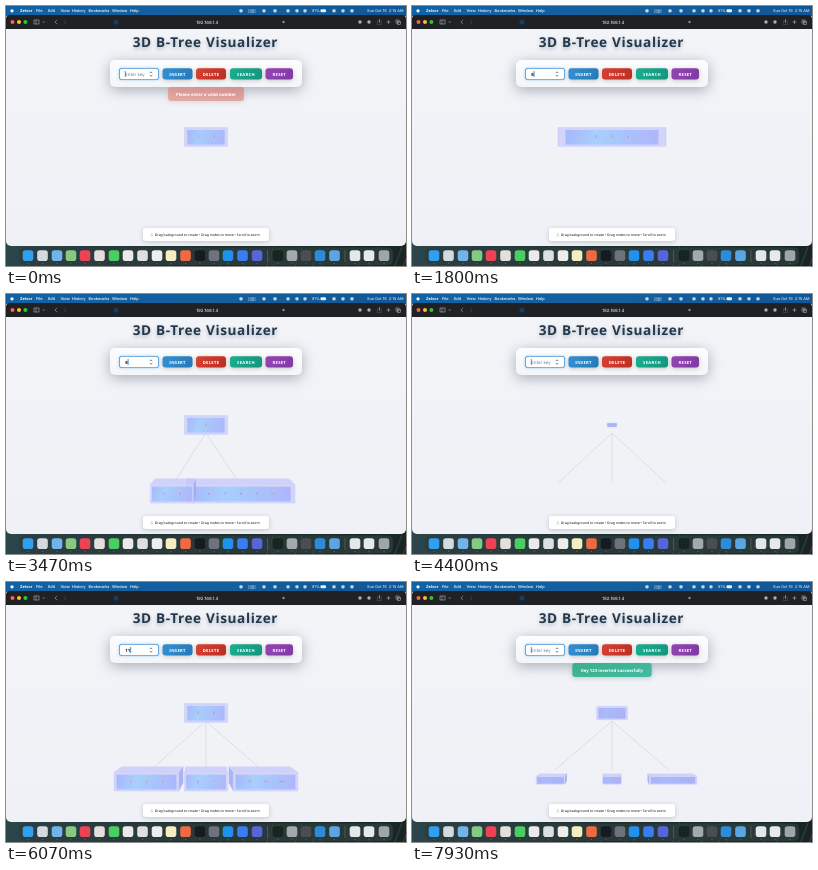
Recreate the animation shown at these times as an HTML page with a canvas. Size 400 by 260 pixels, loop 8 s.

```html
<!DOCTYPE html>
<html lang="en">
<head>
<meta charset="utf-8">
<title>3D B-Tree Visualizer</title>
<style>
  html, body { margin: 0; width: 100%; height: 100%; overflow: hidden; background: #eff1f6; }
  canvas { display: block; width: 100vw; height: 100vh; }
</style>
</head>
<body>
<canvas width="400" height="260"></canvas>
<script>
const ctx = document.querySelector('canvas').getContext('2d');
ctx.textRendering = 'geometricPrecision';
const LOOP = 8000;
const SANS = '"Noto Sans", "Open Sans", sans-serif';
const UI = 'Inter, Roboto, sans-serif';

// Each insert rebuilds the tree. kids: [centre x, number of keys]
const inserts = [
  { at: -600, key: 3 },
  { at: 450, key: 5, typed: 250 },
  { at: 800, key: 6, typed: 620 },
  { at: 1100, key: 7, typed: 950 },
  { at: 1950, key: 8, typed: 1750, kids: [[165, 2], [224, 3]] },
  { at: 2330, key: 9, typed: 2180, kids: [[166, 2], [232, 4]] },
  { at: 2720, key: 10, typed: 2430, kids: [[166, 2], [235, 5]] },
  { at: 4358, key: 88, typed: 3400, kids: [[143, 2], [200, 2], [257, 3]] },
  { at: 5250, key: 2, typed: 4950, kids: [[140.5, 3], [200, 2], [259.5, 3]] },
  { at: 6700, key: 113, typed: 5800, kids: [[140.5, 3], [200, 2], [260, 4]] },
  { at: 7757, key: 123, typed: 7000, kids: [[138.5, 3], [200, 2], [261, 5]] },
];

const clamp = v => Math.max(0, Math.min(1, v));
const easeOut = v => 1 - (1 - clamp(v)) ** 3;

function box(x0, y0, x1, y1, fill, radius = 0) {
  ctx.fillStyle = fill;
  ctx.beginPath();
  ctx.roundRect(x0, y0, x1 - x0, y1 - y0, radius);
  ctx.fill();
}

function disc(x, y, r, fill) {
  ctx.fillStyle = fill;
  ctx.beginPath();
  ctx.arc(x, y, r, 0, 7);
  ctx.fill();
}

function path(points, stroke, width = 0.6) {
  ctx.strokeStyle = stroke;
  ctx.lineWidth = width;
  ctx.beginPath();
  points.forEach(([x, y]) => ctx.lineTo(x, y));
  ctx.stroke();
}

function quad(points, fill) {
  ctx.fillStyle = fill;
  ctx.beginPath();
  points.forEach(([x, y]) => ctx.lineTo(x, y));
  ctx.fill();
}

function text(str, x, y, size, fill, { align = 'left', weight = 400, family = SANS, spacing = 0 } = {}) {
  ctx.font = `${weight} ${size}px ${family}`;
  ctx.letterSpacing = spacing + 'px';
  ctx.textAlign = align;
  ctx.fillStyle = fill;
  ctx.fillText(str, x, y);
}

function gradient(x0, y0, x1, y1, ...colors) {
  const g = ctx.createLinearGradient(x0, y0, x1, y1);
  colors.forEach((c, i) => g.addColorStop(i / (colors.length - 1), c));
  return g;
}

function shadowed(color, blur, dy, draw) {
  ctx.save();
  ctx.shadowColor = color;
  ctx.shadowBlur = blur;
  ctx.shadowOffsetY = dy;
  draw();
  ctx.restore();
}

function drawMenuBar() {
  box(0, 0, 400, 10, gradient(0, 0, 400, 0, '#1262a5', '#14609f', '#0f5797'));
  disc(6, 4.8, 1.6, '#fff');
  const menus = [['Zelvor', 14, 700], ['File', 30], ['Edit', 42], ['View', 54.5], ['History', 66],
    ['Bookmarks', 82.5], ['Window', 106], ['Help', 124]];
  for (const [label, x, weight = 500] of menus) text(label, x, 6.2, 3.9, '#fff', { family: UI, weight });
  for (const x of [235, 258, 269, 282, 291, 299, 328, 337, 346])
    box(x - 1.7, 3.2, x + 1.7, 6.4, 'rgba(255,255,255,.75)', 1.4);
  text('0 KB/s', 242, 4.5, 2.5, '#fff', { family: UI });
  text('0 KB/s', 242, 7.3, 2.5, '#fff', { family: UI });
  text('91%', 306, 6.2, 3.8, '#fff', { family: UI });
  box(314.5, 3.3, 320, 6.3, '#e8f0f8', 1);
  text('Sun Oct 19  2:15 AM', 397.5, 6.2, 3.9, '#fff', { family: UI, align: 'right' });
}

function drawBrowserBar() {
  box(0, 9, 400, 23, '#202124', [4, 4, 0, 0]);
  disc(6.5, 16, 2, '#ff5f57');
  disc(13, 16, 2, '#febc2e');
  disc(19.4, 16, 2, '#28c840');
  const ink = '#adafb2';
  ctx.strokeStyle = ink;
  ctx.lineWidth = 0.6;
  ctx.strokeRect(28, 14, 5, 4);
  path([[30, 14], [30, 18]], ink);
  path([[36.5, 15.3], [37.7, 16.5], [38.9, 15.3]], ink);
  path([[51, 13.8], [49, 16], [51, 18.2]], ink);
  path([[58, 13.8], [60, 16], [58, 18.2]], '#505255');
  disc(110, 16, 2.6, '#173d5e');
  text('192.168.1.4', 201.3, 17.5, 4.4, '#fff', { align: 'center', family: UI });
  disc(277.5, 16, 1.2, '#8b8d90');
  disc(354, 16, 1.7, ink);
  disc(363, 16, 1.7, ink);
  ctx.strokeRect(371.5, 15, 4, 3.3);
  path([[373.5, 17], [373.5, 13]], ink);
  path([[380.5, 16], [384.5, 16]], ink);
  path([[382.5, 14], [382.5, 18]], ink);
  ctx.strokeRect(390, 14, 3, 3);
  ctx.strokeRect(391.3, 15.3, 3, 3);
}

function drawDock() {
  box(0, 234, 400, 260, gradient(0, 0, 400, 0, '#2b474c', '#26393c', '#1b2a26', '#1f2f29', '#182523'));
  for (let i = 0; i < 26; i++) {
    const x = i * 16 + 5 * Math.sin(i * 4);
    path([[x, 260], [x + 7, 241]], i > 15 && i < 20 ? '#345b3b' : '#30484b', 1);
  }
  box(0, 23, 400, 240, gradient(0, 23, 0, 240, '#f2f4f8', '#eff1f6'), [0, 0, 5, 5]);
  box(13, 241.5, 387, 259, 'rgba(44,60,62,.8)', 5);
  const icons = [
    ['#2f9ff0', 22], ['#d5dae0', 36.5], ['#6fb4ea', 51], ['#86c982', 65], ['#ee4258', 79],
    ['#e4dfdc', 93.5], ['#48cf5f', 108], ['#eceae6', 122], ['#dedfe0', 136.5], ['#ededed', 151],
    ['#f5ecc2', 165], ['#ee6a42', 179.5], ['#171b20', 194], ['#6d737a', 208], ['#2390ec', 222],
    ['#397ef1', 236.5], ['#5865d8', 251], ['#17251f', 272], ['#a3a9ad', 286], ['#4a4e53', 300],
    ['#2f8bd6', 314], ['#5aa6e4', 328.5], ['#e4e7e8', 349], ['#e8eaea', 363], ['#a0a6a8', 378],
  ];
  for (const [color, x] of icons) {
    box(x - 5.3, 244.3, x + 5.3, 255, color, 2.8);
    disc(x, 257.3, 0.5, 'rgba(200,210,210,.45)');
  }
  for (const x of [261.5, 339]) path([[x, 244], [x, 256]], 'rgba(200,210,210,.35)');
}

function drawControls(value) {
  shadowed('rgba(44,62,80,.35)', 4, 1.5, () =>
    text('3D B-Tree Visualizer', 126.7, 41, 13.6, '#24384c', { weight: 700, spacing: 0.62 }));
  shadowed('rgba(40,50,70,.38)', 14, 3, () =>
    box(104, 54, 296, 81, gradient(0, 54, 0, 81, '#fdfdfe', '#f4f5f8'), 5));

  shadowed('rgba(52,152,219,.5)', 3, 0, () => box(113, 62, 153, 74, '#4a97d8', 3));
  box(113.8, 62.8, 152.2, 73.2, '#fff', 2.3);
  text(value || 'Enter key', 119.3, 69.6, 4.4, value ? '#111' : '#70757c', { weight: value ? 600 : 400 });
  const caret = value ? 119.6 + ctx.measureText(value).width : 119.3;
  path([[caret, 65], [caret, 71]], '#2478c8', 0.8);
  path([[143.8, 67.2], [145, 65.8], [146.2, 67.2]], '#555', 0.7);
  path([[143.8, 69], [145, 70.4], [146.2, 69]], '#555', 0.7);

  const buttons = [
    ['INSERT', 156.5, 186.5, '#3390d2', '#2779b5'], ['DELETE', 190, 220, '#d94032', '#b92f25'],
    ['SEARCH', 224, 256, '#1aae8e', '#14947c'], ['RESET', 259.5, 287, '#9445b2', '#7f3aa2'],
  ];
  for (const [label, x0, x1, light, dark] of buttons) {
    shadowed('rgba(0,0,0,.22)', 4, 1, () => box(x0, 62.3, x1, 73.6, gradient(x0, 62, x1, 74, light, dark), 3));
    text(label, (x0 + x1) / 2, 69.5, 4.2, '#fff', { align: 'center', weight: 700, spacing: 0.27 });
  }
}

function drawHint() {
  shadowed('rgba(40,50,70,.25)', 5, 1, () => box(137, 222, 263, 235, '#fff', 3));
  box(144.5, 226.8, 147, 231, '#e2e4e8', 1.2);
  text('Drag background to rotate • Drag nodes to move • Scroll to zoom', 148.8, 229.8, 3.45, '#111', { weight: 500 });
}

function drawMessage(label, alpha, half, light, dark) {
  if (alpha <= 0) return;
  ctx.save();
  ctx.globalAlpha = alpha;
  shadowed('rgba(0,0,0,.18)', 5, 1.5, () =>
    box(200 - half, 81, 200 + half, 95, gradient(160, 81, 240, 95, light, dark), 3));
  ctx.globalAlpha = Math.min(1, alpha * 2);
  text(label, 200, 89.6, 4.3, '#fff', { align: 'center', weight: 700 });
  ctx.restore();
}

// A translucent slab whose back face shrinks towards the vanishing point.
function drawNode(x, y, keys, scale, tint) {
  if (scale <= 0) return;
  const w = Math.max(2, keys.length) * 10.8;
  const isChild = y > 150;
  const fy = isChild ? 2.7 : 0;
  const bx = (200 - x) * 0.1;
  const by = -4.4;
  const bw = w * 0.95;
  const bh = 8.2;
  const front = [[-w, fy - 9.4], [w, fy - 9.4], [w, fy + 9.4], [-w, fy + 9.4]];
  const back = [[bx - bw, by - bh], [bx + bw, by - bh], [bx + bw, by + bh], [bx - bw, by + bh]];

  ctx.save();
  ctx.translate(x, y);
  ctx.scale(scale, scale);
  if (isChild) {
    quad([front[0], back[0], back[1], front[1]], 'rgba(196,199,250,.75)');
    if (bx + bw > w) quad([front[1], back[1], back[2], front[2]], 'rgba(160,168,236,.85)');
    if (bx - bw < -w) quad([front[0], back[0], back[3], front[3]], 'rgba(160,168,236,.85)');
  }
  quad(front, 'rgba(206,207,249,.85)');
  const iw = w * (isChild ? 0.92 : 0.86);
  box(-iw, fy - 7, iw, fy + 7.6, gradient(-iw, -7, iw, 7, '#a6b8fb', '#a6d3fc', '#a8c4fc', '#afb6fa'));
  box(-iw, fy - 7, iw, fy + 7.6, `rgba(172,176,250,${0.1 + 0.8 * tint})`);
  path([...front, front[0]], 'rgba(186,191,247,.6)', 0.5);
  keys.forEach((key, i) => {
    const kx = (i - (keys.length - 1) / 2) * 16;
    disc(kx, fy, 2.6, 'rgba(190,196,232,.45)');
    text(String(key), kx, fy + 1.4, 3.8, 'rgba(120,125,160,.65)', { align: 'center' });
  });
  ctx.restore();
}

function drawTree(stage, t) {
  const { at, kids = [] } = inserts[stage];
  const age = t - at;
  const keys = [1, ...inserts.slice(0, stage + 1).map(e => e.key)].sort((a, b) => a - b);
  const rootKeys = [];
  let next = 0;
  const children = kids.map(([x, count], i) => {
    if (i) rootKeys.push(keys[next++]);
    return { x, own: keys.slice(next, next += count) };
  });
  for (const { x } of children)
    path([[200, 139], [200 + (x - 200) * 0.94, 188.5]], '#cdd1d7');
  const tint = clamp(1 - age / 700);
  drawNode(200, 131, kids.length ? rootKeys : keys, easeOut(age / 500), tint);
  children.sort((a, b) => Math.abs(b.x - 200) - Math.abs(a.x - 200));
  for (const { x, own } of children) drawNode(x, 197, own, easeOut((age - 85) / 500), tint);
}

function typedValue(t) {
  const entry = inserts.find(e => t >= e.typed && t < e.at);
  return entry ? String(entry.key).slice(0, 1 + Math.floor((t - entry.typed) / 200)) : '';
}

function render(t) {
  const stage = inserts.findLastIndex(e => t >= e.at);
  const { at, key } = inserts[stage];
  ctx.clearRect(0, 0, 400, 260);
  drawDock();
  drawMenuBar();
  drawBrowserBar();
  drawTree(stage, t);
  drawControls(typedValue(t));
  drawHint();
  if (stage === 0) {
    drawMessage('Please enter a valid number', clamp(0.5 + t / 130), 38, '#f0776a', '#ea6a5d');
  } else {
    const age = t - at;
    const alpha = Math.min(clamp((age - 50) / 150), clamp((690 - age) / 90));
    drawMessage(`Key ${key} inserted successfully`, alpha, 39.7, '#22ae80', '#26b698');
  }
}

const start = performance.now();
function tick() {
  render((performance.now() - start) % LOOP);
  requestAnimationFrame(tick);
}
tick();
</script>
</body>
</html>
```
